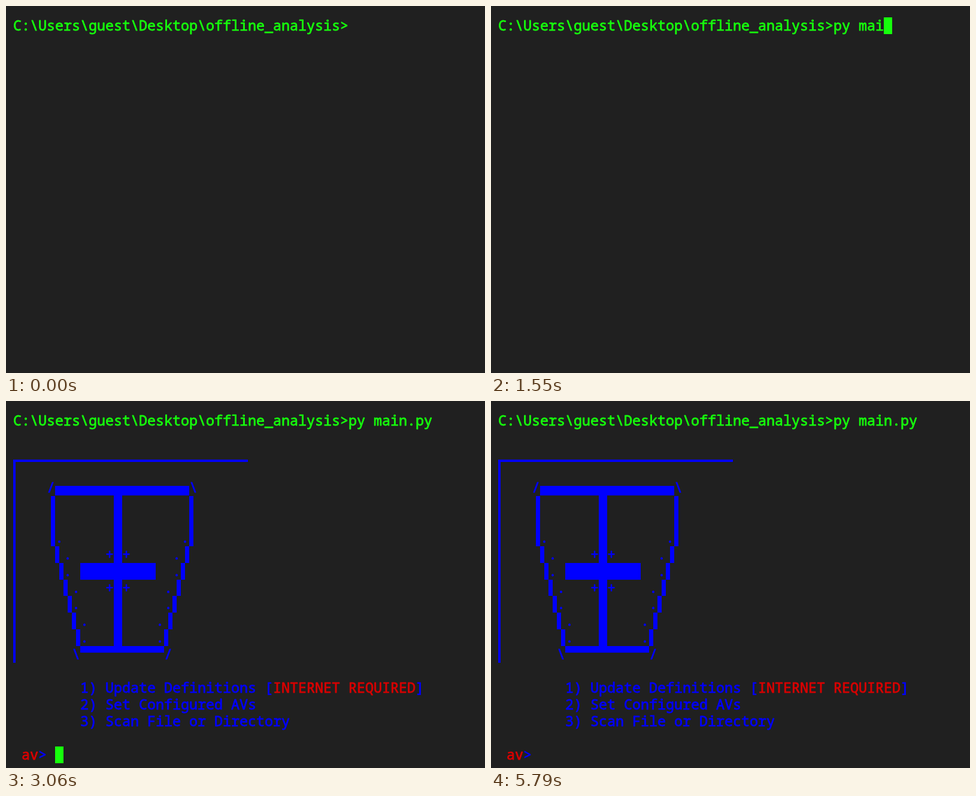
Recreate the animation shown at these times as an HTML page with a canvas. Size 800 by 614 pixels, loop 6240 ms.

```html
<!DOCTYPE html>
<html lang="en">
<head>
<meta charset="utf-8">
<title>Terminal</title>
<style>
  html, body { margin: 0; width: 100%; height: 100%; overflow: hidden; background: #202020; }
  canvas { display: block; }
</style>
</head>
<body>
<canvas id="screen" width="800" height="614"></canvas>
<script>
const ctx = document.getElementById('screen').getContext('2d');

const LOOP = 6240;
const CELL = 14;
const GREEN = '#16ff0c', BLUE = '#0000ff', RED = '#d80000';
const PROMPT = 'C:\\Users\\guest\\Desktop\\offline_analysis>';
const COMMAND = 'py main.py';
const KEY_TIMES = [250, 400, 670, 1240, 1360, 1550, 1640, 2060, 2300, 2420];
const ENTER = 2970, MENU = 3060;
const BLINKS = [3610, 4120, 4700, 5240, 5790];

const colX = col => 12 + col * CELL;
const rowY = row => Math.round(18.9 + row * 27.96);
const countPassed = (times, t) => times.filter(time => t >= time).length;

function rect(x1, y1, x2, y2, color = BLUE) {
  ctx.fillStyle = color;
  ctx.fillRect(x1, y1, x2 - x1, y2 - y1);
}

// A thin stroke gives the glyphs a medium weight.
function text(str, col, row, color = BLUE) {
  ctx.fillStyle = ctx.strokeStyle = color;
  [...str].forEach((ch, i) => {
    const x = colX(col + i), y = rowY(row) + 22;
    ctx.fillText(ch, x, y);
    ctx.strokeText(ch, x, y);
  });
}

function cursor(col, row) {
  rect(colX(col), rowY(row), colX(col + 1), rowY(row + 1), GREEN);
}

function drawBanner() {
  // Frame lines
  rect(12, 98, 404, 102);
  rect(12, 98, 16, 438);

  // Lid and base
  text('/', 4, 4);
  rect(82, 142, 306, 158);
  text('\\', 21, 4);
  text('\\', 7, 14);
  rect(124, 410, 264, 421);
  text('/', 18, 14);

  // Straight then tapering sides, with a dotted inner edge
  for (let row = 5; row <= 13; row++) {
    const step = Math.max(0, row - 7);
    const left = 75 + 7 * step, right = 306 - 7 * step;
    rect(left, rowY(row), left + 7, rowY(row + 1));
    rect(right, rowY(row), right + 7, rowY(row + 1));
    if (row >= 7) {
      const inset = Math.ceil(step / 2);
      text('.', 5 + inset, row);
      text('.', 20 - inset, row);
    }
  }

  // Cross
  rect(180, 158, 194, 410);
  rect(124, rowY(9), 250, rowY(10));
  for (const row of [8, 10]) {
    text('+', 11, row);
    text('+', 13, row);
  }
}

function drawMenu() {
  text('1) Update Definitions [', 8, 16);
  text('INTERNET REQUIRED', 31, 16, RED);
  text(']', 48, 16);
  text('2) Set Configured AVs', 8, 17);
  text('3) Scan File or Directory', 8, 18);
  text('av', 1, 20, RED);
  text('>', 3, 20);
}

function draw(t) {
  rect(0, 0, 800, 614, '#202020');
  ctx.font = '23.333px "Noto Sans Mono", "DejaVu Sans Mono", monospace';
  ctx.lineWidth = 0.8;
  ctx.lineJoin = 'round';
  const line = PROMPT + COMMAND.slice(0, countPassed(KEY_TIMES, t));
  text(line, 0, 0, GREEN);

  if (t >= MENU) {
    drawBanner();
    drawMenu();
    if (countPassed(BLINKS, t) % 2 === 0) cursor(5, 20);
  } else if (t >= ENTER) {
    cursor(0, 1);
  } else if (t >= 30) {
    cursor(line.length, 0);
  }
}

const start = performance.now();
function tick() {
  draw((performance.now() - start) % LOOP);
  requestAnimationFrame(tick);
}
tick();
</script>
</body>
</html>
```
